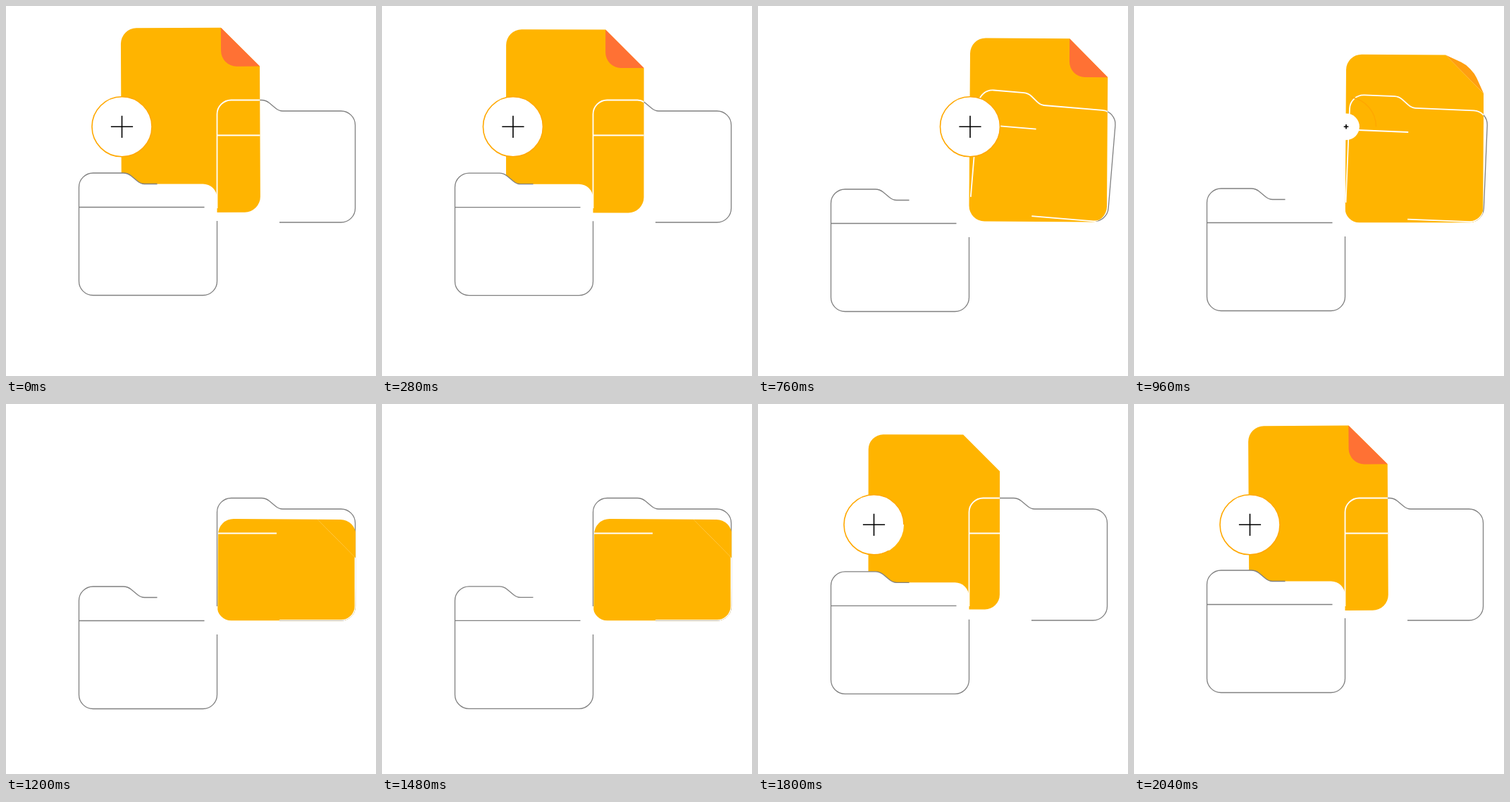
These frames come from a looping animation (525x525 px, 2080 ms). An HTML page with a canvas:

```html
<!DOCTYPE html>
<html lang="en">
<head>
<meta charset="utf-8">
<title>Moving a file between folders</title>
<style>
  html, body { margin: 0; width: 100%; height: 100%; overflow: hidden; background: #fff; }
  canvas { display: block; width: 525px; height: 525px; }
</style>
</head>
<body>
<canvas id="stage"></canvas>
<script>
const SIZE = 525, LOOP = 2080, STEP = 40;
const ORANGE = '#ffb400', GRAY = '#808080';
const canvas = document.getElementById('stage');
const ctx = canvas.getContext('2d');
const ratio = window.devicePixelRatio || 1;
canvas.width = canvas.height = SIZE * ratio;

// Progress from 0 to 1 between two times: linear, cubic in-out, and a soft pulse.
const span = (t, a, b) => Math.min(1, Math.max(0, (t - a) / (b - a)));
const ease = (t, a, b) => {
  const p = span(t, a, b);
  return p < .5 ? 4 * p ** 3 : 1 - 4 * (1 - p) ** 3;
};
const pulse = (t, a, b) => Math.sin(Math.PI * span(t, a, b)) ** 2;
const rad = deg => deg * Math.PI / 180;

// The sheet is born at a negative time, behind the left folder.
const BIRTH = -580, GONE = 1790;
function sheetPose(u) {
  const rise = ease(u, -595, -205);
  const grow = ease(u, -530, -170);
  const settle = ease(u, -200, 240);
  const slide = ease(u, 193, 517);
  const drop = ease(u, 850, 1150);
  const sink = ease(u, 1485, 1785);
  return {
    x: 163 + 98 * grow + 2.4 * settle + 134.6 * slide,
    y: 350 - 188 * rise + 18 * slide - 4 * ease(u, 480, 760) + 117.5 * drop + 147 * sink,
    scale: .5 + .512 * grow - .012 * settle,
    turn: 3.6 - 4 * grow + .4 * settle + 2.6 * pulse(u, 280, 560) + .4 * slide,
    fold: ease(u, -390, -170) - ease(u, 800, 1080)
  };
}

const leftShift = t =>
  24.6 * ease(t, 220, 740) - 2.6 * ease(t, 640, 860) - 23 * ease(t, 1435, 1935);

const rightTilt = t => 4.75 * (ease(t, 315, 645) - ease(t, 810, 1110));

function badgePose(t) {
  const shown = 1 - ease(t, 860, 1020) + ease(t, 1500, 1600);
  return {
    x: 164.5 + (t < 1300 ? 136.5 * ease(t, 110, 610) : 0),
    scale: shown + .1 * (pulse(t, 780, 940) + pulse(t, 1490, 1790)),
    sweep: 1 - span(t, 820, 1000) + span(t, 1600, 1840)
  };
}

const W = 195.5, H = 260, R = 22, EAR = 54.5;
const page = new Path2D(`M${R} 0H${W - EAR}L${W} ${EAR}V${H - R}A${R} ${R} 0 0 1 ${W - R} ${H}
  H${R}A${R} ${R} 0 0 1 0 ${H - R}V${R}A${R} ${R} 0 0 1 ${R} 0Z`);
const ear = new Path2D(`M0 0V${EAR - R}A${R} ${R} 0 0 0 ${R} ${EAR}H${EAR}Z`);

// Both folders share one size; their outlines are open in different places.
const leftEdge = 'M111 15.5H93C88 15.5 86 14 83 11.5L74 4Q69 0 63 0H20A20 20 0 0 0 0 20V153.5' +
  'A20 20 0 0 0 20 173.5H176A20 20 0 0 0 196 153.5V68';
const leftBody = new Path2D(leftEdge + 'V35.5A20 20 0 0 0 176 15.5Z');
const leftLine = new Path2D(leftEdge + 'M0 48.5H178');
const rightEdge = 'M0 153.5V20A20 20 0 0 1 20 0H63Q69 0 74 4L83 11.5C86 14 88 15.5 93 15.5H176' +
  'A20 20 0 0 1 196 35.5V153.5A20 20 0 0 1 176 173.5H88.5';
const rightLine = new Path2D(rightEdge);
const rightInner = new Path2D(rightEdge + 'M0 50H84.5');
const pocket = new Path2D('M299.5 -50V287A20 20 0 0 0 319.5 307.3H476A20 20 0 0 0 496 287V-50Z');

function stroke(path, color, width) {
  ctx.strokeStyle = color;
  ctx.lineWidth = width;
  ctx.stroke(path);
}

function layer(draw) {
  ctx.save();
  draw();
  ctx.restore();
}

function drawRight(t, path, color, width) {
  layer(() => {
    ctx.translate(495.5, 307);
    ctx.rotate(rad(rightTilt(t)));
    ctx.translate(-196, -173.5);
    stroke(path, color, width);
  });
}

function drawSheet(u, t) {
  if (u < BIRTH || u > GONE) return;
  const { x, y, scale, turn, fold } = sheetPose(u);
  layer(() => {
    if (u > 780) ctx.clip(pocket);
    const base = ctx.getTransform();
    ctx.translate(x, y);
    ctx.rotate(rad(turn));
    ctx.scale(scale, scale);
    ctx.translate(-W / 2, -H / 2);
    ctx.fillStyle = ORANGE;
    ctx.fill(page);

    // Flip the ear across its diagonal.
    layer(() => {
      ctx.translate(W - EAR, 0);
      ctx.transform(fold, 1 - fold, 1 - fold, fold, 0, 0);
      ctx.fillStyle = `rgb(255,${180 - 67 * fold},${52 * fold})`;
      ctx.fill(ear);
    });

    // The right folder shows in white where it crosses the sheet.
    ctx.clip(page);
    ctx.setTransform(base);
    drawRight(t, rightInner, '#fff', 1.8);
  });
}

function drawLeft(t) {
  layer(() => {
    ctx.translate(103.5, 237 + leftShift(t));
    ctx.fillStyle = '#fff';
    ctx.fill(leftBody);
    stroke(leftLine, GRAY, 1.3);
  });
}

function drawBadge(t) {
  const { x, scale, sweep } = badgePose(t);
  layer(() => {
    ctx.translate(x, 171.3);
    if (sweep > 0) {
      const r = 42.5 * Math.max(1, scale);
      const disc = new Path2D(), ring = new Path2D();
      disc.arc(0, 0, r * Math.min(1, sweep * 2), 0, Math.PI * 2);
      ring.arc(0, 0, r, 0, -Math.PI * 2 * sweep, true);
      ctx.fillStyle = '#fff';
      ctx.fill(disc);
      stroke(ring, '#ffa800', 1.6);
    }
    if (scale > 0) {
      const s = 15.6 * scale;
      stroke(new Path2D(`M${-s} 0H${s}M0 ${-s}V${s}`), '#000', 1.6);
    }
  });
}

function draw(t) {
  ctx.setTransform(ratio, 0, 0, ratio, 0, 0);
  ctx.fillStyle = '#fff';
  ctx.fillRect(0, 0, SIZE, SIZE);
  drawRight(t, rightLine, GRAY, 1.3);
  drawSheet(t, t);
  drawSheet(t - LOOP, t);
  drawLeft(t);
  drawBadge(t);
}

const start = performance.now();
function tick() {
  const t = (performance.now() - start) % LOOP;
  draw(Math.floor(t / STEP) * STEP);
  requestAnimationFrame(tick);
}
tick();
</script>
</body>
</html>
```
